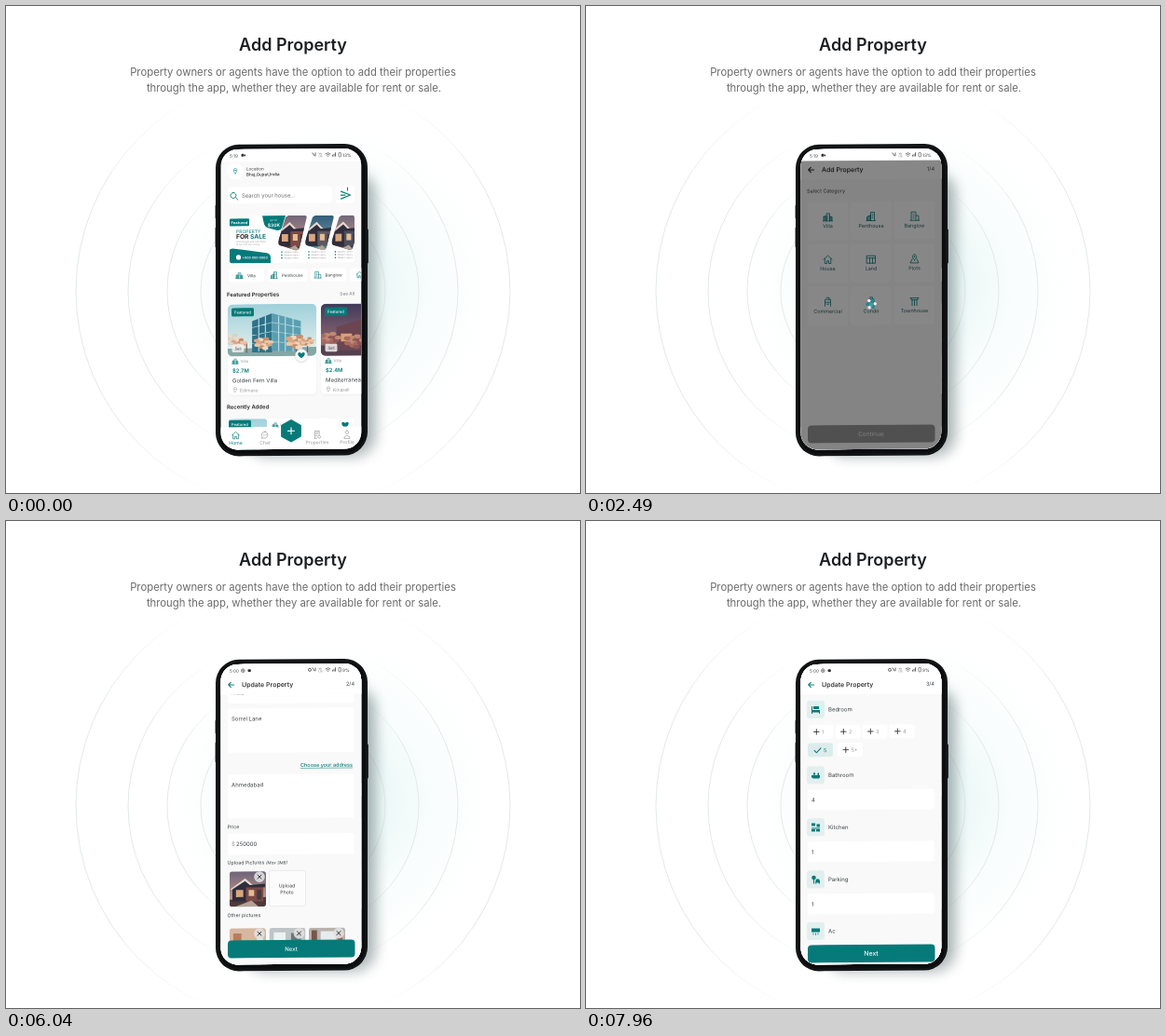
Animation, 616 px wide and 523 px high, one loop 8 s. Source, as an HTML page:

```html
<!DOCTYPE html>
<html lang="en">
<head>
<meta charset="utf-8">
<title>Add Property</title>
<style>
html, body { margin: 0; height: 100%; overflow: hidden; background: #fff; }
svg { display: block; }
#stage { width: 100vw; height: 100vh; font-family: Inter, "Open Sans", sans-serif; }
</style>
</head>
<body>
<svg id="stage" viewBox="0 0 616 523"></svg>
<script>
const TEAL = '#067a79', INK = '#3a3f42', GREY = '#999', PALE = '#f9f9f9';
let clips = 0;

const text = (x, y, s, size, fill = INK, more = '') =>
  `<text x="${x}" y="${y}" font-size="${size}" fill="${fill}" ${more}>${s}</text>`;
const mid = (x, y, s, size, fill, more = '') => text(x, y, s, size, fill, 'text-anchor="middle" ' + more);
const rect = (x, y, w, h, r = 0, fill = '#fff', more = '') =>
  `<rect x="${x}" y="${y}" width="${w}" height="${h}" rx="${r}" fill="${fill}" ${more}/>`;
const disc = (x, y, r, fill, more = '') => `<circle cx="${x}" cy="${y}" r="${r}" fill="${fill}" ${more}/>`;
const fill = (d, color, more = '') => `<path d="${d}" fill="${color}" ${more}/>`;
const line = (d, color = TEAL, w = .8, more = '') =>
  `<path d="${d}" fill="none" stroke="${color}" stroke-width="${w}" stroke-linecap="round" stroke-linejoin="round" ${more}/>`;
const group = (s, more = '') => `<g ${more}>${s}</g>`;
const at = (x, y, s, k = 1) => group(s, `transform="translate(${x} ${y}) scale(${k})"`);
const bold = 'font-weight="600"', medium = 'font-weight="500"';

// Artwork on a 40 x 40 field
const crown = (x, y, r, colors) => Array.from({ length: 14 }, (_, i) =>
  disc(x + r * Math.cos(i * 2.4) * Math.sqrt(i / 14), y + r * 1.25 * Math.sin(i * 2.4) * Math.sqrt(i / 14), r * .38, colors[i % colors.length])).join('');
const house = (sky, wall, ground) => rect(0, 0, 40, 40, 0, `url(#${sky})`) +
  fill('M0 32L40 29V40H0Z', ground) + fill('M3 19L17 10L25 17V34H3Z', '#302d3c') +
  fill('M1 20L17 8L27 17L25 18L17 11L2 21Z', '#e8d9d0') + fill('M18 17H37V34H18Z', wall) +
  fill('M16 16L39 14V18H16Z', '#2f2e3c') + rect(7, 21, 8, 8, 0, '#d9a87c') +
  rect(21, 21, 6, 7, 0, '#e6bd92') + rect(30, 21, 5, 11, 0, '#463a40') + fill('M6 40L24 33L32 40Z', '#b3a296');
const villas = [house('dusk', '#7c4a44', '#4c3a3c'), house('night', '#5c5a5e', '#3b8793'), house('dusk', '#4b4c5b', '#38414a')];
const autumn = ['#d9a685', '#e8c4a6', '#c78f6d', '#efd6bf'];
const glass = rect(0, 0, 40, 40, 0, 'url(#day)') + fill('M0 34L40 33V40H0Z', '#86a7a6') + crown(2, 27, 3.5, ['#d8d2c4', '#e6dccb']) +
  fill('M11 13L20 7V37H11Z', '#2d7189') + fill('M20 7L33 13V36H20Z', '#5a9fb1') +
  line('M11 18L20 14L33 18M11 24L20 21L33 24M11 30L20 29L33 30M14 11V36M17 9V36M23 9V36M26 10V36M29.5 11V36', '#c3dfe6', .45) +
  line('M8.5 30V37M16 32V37M31 31V37M36 32V37', '#775b50', .5) +
  [[5, 30, 3], [16, 30, 3.6], [31, 29, 4.2], [36, 29, 2.6]].map(c => crown(...c, autumn)).join('');
const sunset = rect(0, 0, 40, 40, 0, 'url(#eve)') + fill('M0 32H40V40H0Z', '#54404e') +
  fill('M7 18L20 11V36H7Z', '#6b4552') + fill('M20 11L34 16V36H20Z', '#43374d') + rect(9, 23, 5, 6, 0, '#dba273') +
  crown(4, 27, 4, ['#a86a60', '#c08a72', '#8f5558']) + crown(15, 29, 4, ['#a86a60', '#c08a72', '#8f5558']);
const wall = color => rect(0, 0, 40, 40, 0, color) + fill('M0 29H40V40H0Z', '#ad9081');
const bed = wall('#d7b7a0') + rect(4, 6, 9, 11, 0, '#b87c5f') + rect(30, 10, 7, 18, 0, '#eadfd6') +
  fill('M3 26L17 20L39 26V35L18 39L3 33Z', '#f1ebe7') + fill('M4 25L14 20L20 23L9 28Z', '#d19a96') +
  fill('M16 33L39 26V35L18 39Z', '#c8aca4');
const lounge = wall('#bfc4c7') + rect(5, 5, 13, 17, 0, '#eef2f3') + rect(24, 6, 11, 8, 0, '#6f777c') +
  fill('M3 22H15V31H3Z', '#7d8588') + fill('M12 25H35V33H12Z', '#e6e7e6') + rect(17, 31, 12, 4, 1, '#55504e');
const desk = wall('#b9b1ac') + rect(13, 4, 17, 16, 0, '#e7ecee') + fill('M3 3H9V29H3Z', '#77564a') +
  rect(8, 22, 26, 3, 0, '#704b3e') + rect(16, 15, 9, 7, 0, '#3b3f48') + fill('M18 25H26V36H18Z', '#5e3d38') + rect(32, 8, 5, 22, 0, '#8f6757');

const photo = (art, x, y, w, h, r = 3, d) => {
  const id = 'c' + clips++;
  const shape = d ? `<path d="${d}"/>` : rect(x, y, w, h, r);
  return `<clipPath id="${id}">${shape}</clipPath>` +
    group(group(art, `transform="translate(${x} ${y}) scale(${w / 40} ${h / 40})"`), `clip-path="url(#${id})"`);
};

// Icons, about 9 x 9
const icons = {
  tower: fill('M0 4H3V9H0ZM6.5 4.5H9V9H6.5Z', TEAL, 'opacity=".55"') + line('M0 9V4H3V9M3 9V1H6.5V9M6.5 9V4.5H9V9M-.5 9H9.5M4.5 3H5M4.5 5H5M4.5 7H5'),
  flats: fill('M0 5L4 3V9H0Z', TEAL, 'opacity=".55"') + line('M0 9V5L4 3V9M4 9V0H8V9M-.5 9H9M5.5 2H6.5M5.5 4H6.5M5.5 6H6.5'),
  block: line('M1 9V0H6V9M6 4H9V9M0 9H9.5M3 2.5H4M3 4.5H4M3 6.5H4'),
  home: line('M0 4.5L4.5 .5L9 4.5M1.3 4V9H3.6V6.2H5.5V9H7.8V4'),
  land: line('M0 1H9V9H0ZM0 3.5H9M3 3.5V9M6 3.5V9'),
  plot: line('M4.5 6C1 3 2.5 0 4.5 0S8 3 4.5 6ZM2 5L0 9H9L7 5') + disc(4.5, 2.4, .8, TEAL),
  shop: line('M1.5 9V2H7.5V9M3 0H6V2M1.5 5H7.5M3.5 7H5.5'),
  town: line('M0 1H9M1 1V3H8V1M2 3V9M4.5 3V9M7 3V9'),
  pin: line('M3 8C-1 4 0 0 3 0S7 4 3 8Z') + disc(3, 3, 1, TEAL),
  person: line('M1 9C1 5 8 5 8 9Z') + line('M4.5 0A2 2 0 1 1 4.4 0Z'),
  chat: line('M4.5 .5A4 4 0 1 1 2 8L.5 8.6L1 6.5A4 4 0 0 1 4.5 .5ZM3 4.5H3.1M4.5 4.5H4.6M6 4.5H6.1'),
  list: line('M1.5 9V0H7V4M3 2H5.5M3 4H5M3 6H4M1.5 9H4') + line('M7 5.5A1.7 1.7 0 1 1 6.9 5.5Z'),
  bed: fill('M0 1H1V5H9V9H8V7.5H1V9H0ZM2 1H8V4H2Z', TEAL),
  bath: fill('M0 4.5H9V6C9 8 8 8 7 8H2C1 8 0 7 0 6ZM6.5 4.5V2H8V4.5Z', TEAL) + disc(3, 3, 1.2, TEAL),
  kitchen: fill('M0 0H4V3H0ZM5.5 1H9V4H5.5ZM0 5H9V6H0ZM0 6.5H4V9H0ZM5 6.5H9V9H5Z', TEAL),
  parking: disc(2.5, 2.5, 2.3, TEAL) + fill('M2 4.5H3V9H2ZM4.5 5L5.5 4H8L9 6V9H7.8V8H5.2V9H4Z', TEAL),
  ac: fill('M0 1.5H9V5.5H0Z', TEAL) + line('M2 7V8M4.5 7V8.5M7 7V8', TEAL, .8)
};
const tint = (name, color) => icons[name].replaceAll(TEAL, color);
const heart = (x, y) => disc(x, y, 6.5, '#fff', 'filter="url(#soft)"') +
  fill(`M${x} ${y + 3.4}C${x - 7} ${y - 1} ${x - 2.5} ${y - 5} ${x} ${y - 1.5}C${x + 2.5} ${y - 5} ${x + 7} ${y - 1} ${x} ${y + 3.4}Z`, TEAL);
const tag = (x, y) => rect(x, y, 24, 9, 1.5, TEAL) + mid(x + 12, y + 6.1, 'Featured', 4.2, '#fff', medium);
const button = (y, label, color = TEAL, ink = '#fff', size = 6) =>
  rect(238, y, 136.5, 19, 4, color) + mid(306, y + 11.8, label, size, ink, medium);

const status = (time, level, extra) => rect(228, 150, 156, 17) + text(240, 162.3, time, 4.6) + extra +
  line('M329 158L331 161M332 158V161M350.5 161.5V160.5M352 161.5V159.5M353.5 161.5V158', '#444', .8) +
  text(335.5, 159.8, 'Vo', 2.8, '#444') + text(335.5, 162.5, 'LTE', 2.4, '#444') +
  line('M343 159Q345.5 156.8 348 159M344 160.3Q345.5 159 347 160.3M345.5 161.6V161.7', '#444', .7) +
  rect(357, 157.8, 2.4, 4.4, .5, 'none', 'stroke="#444" stroke-width=".6"') + text(361, 162.3, level, 4.7);
const camera = x => rect(x, 158.5, 3, 3, 1, '#333') + fill(`M${x + 2.7} 160L${x + 4.5} 158.8V161.3Z`, '#333');
const head = (title, step, arrow) => rect(228, 166, 156, 20) +
  line('M244.5 175.5H239M241.3 172.9L238.7 175.5L241.3 178.1', arrow, 1.1) +
  text(253, 178, title, 7, '#222', medium) + text(374, 177.2, step, 5.6, INK, 'text-anchor="end"');
const page = (id, s) => group(rect(228, 150, 156, 330, 0, PALE) + s, `id="${id}"`);

// Home
const slides = [0, 29, 57.5];
const banner = rect(240, 225, 134, 51, 3) +
  rect(240, 228, 21, 8, 1, TEAL) + text(241.5, 233.8, 'Featured', 4.2, '#fff', bold) +
  fill('M275 225H300L296 238Q295 241 291 241L281 238Q278 237 277 234Z', TEAL) +
  mid(287, 231, 'UP TO', 2.6, '#fff') + mid(287.5, 237, '$30K', 5, '#fff', bold) +
  text(247, 243.6, 'PROPERTY', 5, TEAL) +
  text(247, 249.6, `FOR <tspan fill="${TEAL}">SALE</tspan>`, 6.7, '#222', 'font-weight="700"') +
  text(247, 253.6, 'Find a bright and calm place', 2.4, GREY) + text(247, 256.4, 'to live with your family', 2.4, GREY) +
  fill('M240 261L243 260L280 265Q284 266 284 270V276H240Z', TEAL) + disc(249.5, 269.5, 2.6, '#fff') +
  text(253.5, 271.2, '+000 000 0000', 3.5, '#fff', bold) +
  slides.map((d, i) => photo(villas[i], 290 + d, 224, 34, 40, 0,
    `M${303 + d} 225H${320 + d}Q${323.5 + d} 225 ${322.5 + d} 228L${315 + d} 259Q${314 + d} 263 ${310 + d} 262L${294 + d} 257Q${291.5 + d} 256 ${292 + d} 253L${300 + d} 227Z`) +
    [265, 268.2, 271.4].map(y => disc(296 + d, y - .8, .8, TEAL) + text(298.5 + d, y, 'Modern rooms', 2.3, GREY)).join('')).join('');
const slide = group(banner, 'clip-path="url(#banner-box)"');
const chip = (x, w, name, icon, tx) => rect(x, 282, w, 14, 3) + at(icon[1], 285.5, icons[icon[0]], .75) + text(tx, 290.9, name, 4.5, INK);
const card = (x, art, price, name, place) => rect(x, 320, 95, 97, 5, '#fff', 'filter="url(#faint)"') +
  photo(art, x, 320, 95, 56, 5) + tag(x + 4, 324) +
  rect(x + 4.5, 363, 13, 8.5, 1.5, '#f3f3f3', 'opacity=".85"') + mid(x + 11, 369, 'Sell', 4.2) +
  at(x + 5, 378, icons.tower, .65) + text(x + 13.5, 382.6, 'Villa', 4.3, GREY) +
  text(x + 5, 393.4, price, 5.8, TEAL, bold) + text(x + 5, 404, name, 6, INK) +
  at(x + 6, 409, tint('pin', GREY), .65) + text(x + 13, 414.2, place, 5, GREY) + heart(x + 79, 375);
const navItem = (x, name, label, color) => at(x - 4, 456.5, tint(name, color), .88) + mid(x, 470.6, label, 5.1, color);
const pill = (id, x, y, w, label) => group(rect(x, y, w, 16, 7, TEAL, 'filter="url(#soft)"') +
  at(291, y + 4, tint('tower', '#fff'), .8) + text(301.5, y + 10, label, 5.3, '#fff'), `id="${id}"`);

const home = page('home', status('5:19', '13%', camera(252.5)) +
  disc(246, 177, 9, '#fff') + at(244, 174, icons.pin, .7) +
  text(258, 176.3, 'Location', 4.6) + text(258, 182.2, 'Bhuj,Gujrat,India', 4.5, '#222', medium) +
  rect(238, 194, 112, 18, 4) + line('M244 200A3 3 0 1 1 243.9 200ZM246.5 205.3L249 207.8', TEAL, .9) +
  text(253, 205.4, 'Search your house...', 5.9, '#666') +
  rect(354, 193, 20, 19, 4) + line('M359.5 199.5L369.5 203.5L359.5 207.5M359.5 203.5H364M366.5 198.5V195.5', TEAL, 1.1) +
  group(slide + group(slide, 'transform="translate(149 0)"'), 'id="banner"') +
  chip(239, 38, 'Villa', ['tower', 247], 259) + chip(281, 42, 'Penthouse', ['flats', 284.5], 296) +
  chip(327, 38, 'Banglow', ['block', 331], 342.5) + chip(369.5, 38, '', ['home', 376], 388) +
  text(237, 311.6, 'Featured Properties', 5.9, '#222', bold) + text(374, 311, 'See All', 4.8, '#777', 'text-anchor="end"') +
  card(238, glass, '$2.7M', 'Golden Fern Villa', 'Edimara') + card(338, sunset, '$2.4M', 'Mediterranean', 'Koupali') +
  text(237, 432.2, 'Recently Added', 5.9, '#222', bold) +
  rect(238, 443, 136, 40, 4, '#fff', 'filter="url(#faint)"') + photo(glass, 239, 443, 41, 40) + tag(239, 444.5) +
  at(286, 447, icons.tower, .65) + text(294, 451.6, 'Villa', 4.3, GREY) + heart(364, 450) +
  fill('M228 452H289Q294 452 294 457Q295 470 306 470T318 457Q318 452 323 452H384V480H228Z', '#fff') +
  navItem(246.5, 'home', 'Home', TEAL) + navItem(278, 'chat', 'Chat', GREY) +
  navItem(334, 'list', 'Properties', GREY) + navItem(366, 'person', 'Profile', GREY) +
  pill('rent', 272, 424, 69, 'For Rent') + pill('sell', 282, 405, 48, 'For Sell') +
  `<path d="M306 445.3L315.7 450.8V461.8L306 467.3L296.3 461.8V450.8Z" fill="${TEAL}" stroke="${TEAL}" stroke-width="2.4" stroke-linejoin="round"/>` +
  group(line('M302.5 456.3H309.5M306 452.8V459.8', '#fff', 1.1), 'id="plus"'));

// Categories
const kinds = [['Villa', 'tower'], ['Penthouse', 'flats'], ['Banglow', 'block'], ['House', 'home'], ['Land', 'land'],
  ['Plots', 'plot'], ['Commercial', 'shop'], ['Condo', 'shop'], ['Townhouse', 'town']];
const cell = ([name, icon], i) => {
  const x = 238 + i % 3 * 46.5, y = 210 + Math.floor(i / 3) * 45.7;
  return rect(x, y, 43, 41, 3) + at(x + 17, y + 11.5, icons[icon]) + mid(x + 21.5, y + 28, name, 5.4, '#29585c');
};
const cats = page('cats', status('5:19', '13%', camera(252.5)) + head('Add Property', '1/4', '#222') +
  group(text(237, 200.2, 'Select Category', 5.4) + kinds.map(cell).join(''), 'id="kinds"') +
  button(450, 'Continue', '#979797', '#e4e4e4', 6.4) +
  group(rect(284.5, 301.4, 43, 41, 3, 'none', `stroke="${TEAL}"`) + button(450, 'Continue', TEAL, '#fff', 6.4), 'id="picked"') +
  group(rect(228, 166, 156, 314, 0, '#000', 'opacity=".47"') +
    group([0, 1, 2, 3, 4, 5].map(i => disc(306 + 4.2 * Math.cos(i * 1.047), 320 + 4.2 * Math.sin(i * 1.047), 1.7, i % 2 ? '#e9f3f4' : '#1b8ea0')).join('') +
      disc(306, 320, 1.8, '#2ba3b3'), 'id="loader"'), 'id="dim"'));

// Details form
const label = (y, s) => text(237.5, y, s, 5.3);
const field = (y, h, s, x = 242) => rect(238, y, 135.5, h, 2) + text(x, y + 13.2, s, 6, INK);
const cross = (x, y) => disc(x, y, 5.8, '#e2e2e2', 'opacity=".9"') + line(`M${x - 2} ${y - 2}l4 4m0 -4l-4 4`, '#222', .9);
const picture = (art, x, y) => photo(art, x, y, 39, 38) + cross(x + 32, y + 6);
const upload = (x, y) => rect(x, y, 39, 38, 2, '#fcfcfc', 'stroke="#e4e4e4" stroke-width=".7"') +
  mid(x + 19, y + 18, 'Upload', 5.2) + mid(x + 19, y + 25, 'Photo', 5.2);
const later = disc(254.3, 160.3, 1.9, 'none', 'stroke="#444" stroke-width=".6"') + line('M254.3 159.2V161.4M253.2 160.3H255.4', '#444', .5) +
  rect(259.5, 159, 3.4, 2.6, 1, '#333') + disc(326, 160, 1.5, 'none', 'stroke="#444" stroke-width=".8"');
const top2 = step => status('5:00', '9%', later) + head('Update Property', step, TEAL);
const form = page('form', group(group(
  label(200.4, 'Property name') + field(208, 22.5, 'Plum corner') +
  label(243, 'Description') + field(251, 64, 'Outstanding location') +
  label(331, 'Address') + at(316, 325.5, tint('pin', '#aaa'), .7) + text(322, 330.6, 'Choose Location', 5.5, TEAL, medium) +
  field(342, 22.5, 'Delhi') + field(369.6, 22.5, 'Delhi') + field(397.2, 22.5, 'India') + field(425, 47.5, 'Sorrel Lane') +
  text(316, 488.2, 'Choose your address', 5.5, TEAL, medium + ' text-decoration="underline"') + field(496, 47, 'Ahmedabad') +
  label(554, 'Price') + field(559.5, 22.5, '250000', 247) + text(242, 572.7, '$', 6, GREY) +
  label(592.4, 'Upload Pictures') + text(279, 592.4, '(Max 3MB)', 4.4, INK, 'font-style="italic"') +
  picture(villas[0], 240, 600) + upload(282.5, 599.5) +
  label(649, 'Other pictures') + picture(bed, 240, 661) + picture(lounge, 282.5, 661) + picture(desk, 325, 661) +
  upload(240, 704), 'id="formScroll"'), 'clip-path="url(#view)"') + top2('2/4') + button(450, 'Next'));

// Rooms
const room = (y, icon, s) => rect(237, y - 9.5, 19, 19, 3, '#e1efef') + at(242, y - 4.5, icons[icon]) + text(260, y + 2.2, s, 6, INK);
const option = (x, y, s) => rect(x, y, 27, 15, 3) + line(`M${x + 6} ${y + 7.5}h5.6m-2.8 -2.8v5.6`, '#333', .9) + text(x + 14.5, y + 9.7, s, 5.6, GREY);
const rooms = page('rooms', group(group(
  room(202, 'bed', 'Bedroom') + [1, 2, 3, 4].map((n, i) => option(238.5 + i * 29, 218.5, n)).join('') +
  rect(238, 238, 27, 15, 3, '#dcecec') + line('M245 246L247.4 248.4L252 243.5', TEAL, 1) + text(255, 248, '5', 5.6, TEAL) +
  option(270, 238, '5+') + room(272.5, 'bath', 'Bathroom') + field(288, 22, '4') + room(328.5, 'kitchen', 'Kitchen') +
  field(344, 22, '1') + room(384.5, 'parking', 'Parking') + field(400, 22, '1') + room(440, 'ac', 'Ac') + field(455, 22, '1'),
  'id="roomScroll"'), 'clip-path="url(#view)"') + top2('3/4') + button(455, 'Next', TEAL, '#fff', 6.9));

const stops = list => list.map(([o, c, a = 1]) => `<stop offset="${o}" stop-color="${c}" stop-opacity="${a}"/>`).join('');
const sky = (id, a, b) => `<linearGradient id="${id}" x2="0" y2="1">${stops([[0, a], [1, b]])}</linearGradient>`;
const shadow = (id, d, o) => `<filter id="${id}" x="-30%" y="-30%" width="160%" height="160%"><feDropShadow dx="0" dy=".8" stdDeviation="${d}" flood-opacity="${o}"/></filter>`;
const clip = (id, shape) => `<clipPath id="${id}">${shape}</clipPath>`;
const defs = `<defs>${sky('dusk', '#6d6378', '#d8a793')}${sky('night', '#2f5a78', '#86a9b3')}${sky('day', '#9fd0da', '#e9f1ee')}${sky('eve', '#40395a', '#a8787a')}
  ${shadow('soft', 1.2, .25)}${shadow('faint', 1.2, .06)}
  <radialGradient id="glow" gradientUnits="userSpaceOnUse" cx="350" cy="300" r="170">${stops([[0, '#e2f3f3'], [.35, '#eef8f8'], [.65, '#f9fdfd'], [1, '#fff']])}</radialGradient>
  <linearGradient id="ring" x2="0" y2="1">${stops([[.05, '#e2e9e8', 0], [.25, '#e2e9e8'], [.8, '#e2e9e8'], [.97, '#e2e9e8', 0]])}</linearGradient>
  <filter id="blur" x="-30%" y="-30%" width="160%" height="160%"><feGaussianBlur stdDeviation="7"/></filter>
  ${clip('screen', rect(230.5, 153.5, 150.8, 322.5, 18))}${clip('view', rect(228, 186, 156, 266))}${clip('banner-box', rect(240, 225, 134, 51, 3))}</defs>`;

document.getElementById('stage').innerHTML = defs + disc(350, 300, 170, 'url(#glow)') +
  [99, 135, 177, 233].map(r => disc(308, 306, r, 'none', 'stroke="url(#ring)"')).join('') +
  mid(308, 48, 'Add Property', 18, '#1c1f22', bold) +
  mid(308, 74.6, 'Property owners or agents have the option to add their properties', 11.3, '#6b6b6b') +
  mid(309, 92.2, 'through the app, whether they are available for rent or sale.', 11.3, '#6b6b6b') +
  rect(256, 178, 141, 306, 24, '#3f5557', 'opacity=".42" filter="url(#blur)"') +
  group(rect(224.6, 213, 3, 15, 1, '#111') + rect(224.6, 237, 3, 22, 1, '#111') + rect(386, 240, 2.8, 37, 1, '#111') +
    rect(225, 148.4, 163, 334.6, 25, '#0b0d0e') + rect(226.8, 150.2, 159.6, 331, 23, 'none', 'stroke="#2c3133" stroke-width=".5"') +
    group(home + cats + form + rooms + disc(0, 0, 4, '#fff', 'id="dot" stroke="#bbb" stroke-width=".5"'), 'clip-path="url(#screen)"'),
    'transform="translate(0 2.14) skewY(-.4)"');

const el = {};
document.querySelectorAll('g[id], #dot').forEach(e => el[e.id] = e);
const show = (id, a) => { el[id].setAttribute('opacity', a); el[id].style.display = a > 0 ? '' : 'none'; };
const move = (id, x, y) => el[id].setAttribute('transform', `translate(${x} ${y})`);

// Touches: start, end, from x, y, to x, y
const touches = [[360, 560, 306, 457, 306, 457], [1240, 1480, 303, 413, 303, 413], [3030, 3180, 306, 320, 306, 320],
  [3340, 3460, 306, 460, 306, 460], [4990, 5130, 248, 402, 248, 402], [5130, 5480, 248, 402, 248, 270],
  [6700, 6760, 248, 377, 248, 377], [6760, 7050, 248, 377, 248, 310], [7300, 7440, 306, 460, 306, 460]];

function draw(t) {
  const ramp = (a, b) => Math.min(1, Math.max(0, (t - a) / (b - a)));
  const ease = (a, b) => { const p = ramp(a, b); return p * p * (3 - 2 * p); };

  move('banner', -149 * ease(1240, 1750), 0);
  el.plus.setAttribute('transform', `rotate(${45 * ease(450, 800)} 306 456.3)`);
  for (const [id, from, rise] of [['rent', 500, 24], ['sell', 640, 43]]) {
    const p = ease(from, from + 400);
    show(id, p);
    move(id, 0, rise * (1 - p));
  }
  show('cats', ramp(1560, 1800));
  show('kinds', ramp(1880, 2130));
  show('dim', ramp(2280, 2400) * (1 - ramp(2520, 2580)));
  el.loader.setAttribute('transform', `rotate(${t * .36} 306 320)`);
  show('picked', ramp(3030, 3300));

  show('form', ramp(3430, 3590));
  const glide = 271 * (1 - Math.exp(-1.925 * Math.max(0, t - 5130) / 1000));
  move('formScroll', 0, -glide - 50 * ease(6760, 7250));

  show('rooms', ramp(7440, 7580));
  move('roomScroll', 0, 9 * (1 - ramp(7720, 7960)));

  const touch = touches.find(([a, b]) => t >= a && t < b);
  show('dot', touch ? .8 : 0);
  if (touch) {
    const [a, b, x, y, x2, y2] = touch, p = ramp(a, b);
    move('dot', x + (x2 - x) * p, y + (y2 - y) * p);
  }
}

const start = performance.now();
(function tick() {
  draw((performance.now() - start) % 8000);
  requestAnimationFrame(tick);
})();
</script>
</body>
</html>
```
